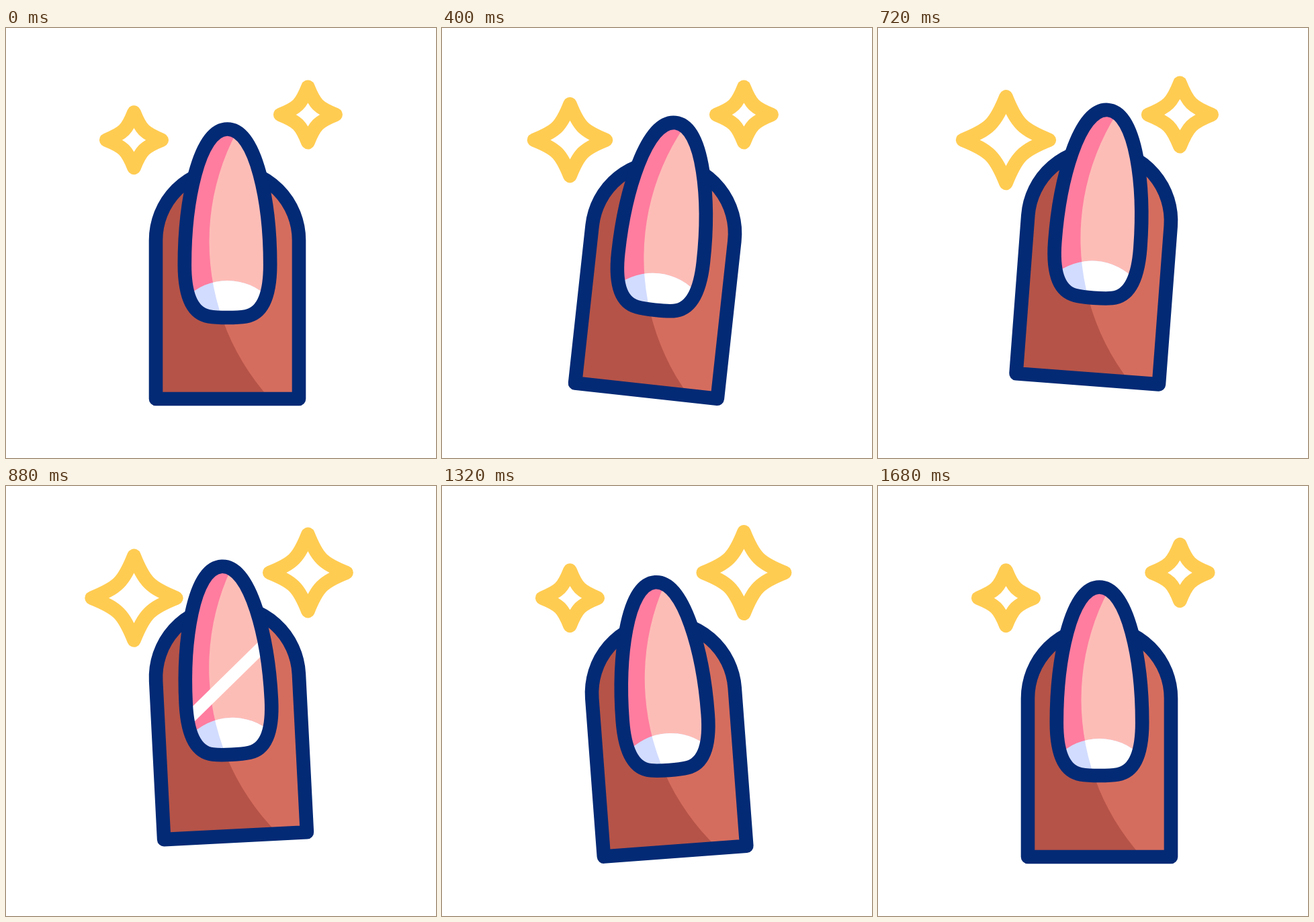
These frames come from a looping animation (640x640 px, 1.72 s). An HTML page with a canvas:

```html
<!DOCTYPE html>
<html lang="en">
<head>
<meta charset="utf-8">
<title>Shiny nail</title>
<style>
  html, body { margin: 0; width: 100%; height: 100%; overflow: hidden; background: #fff; }
  canvas { display: block; width: 640px; height: 640px; }
</style>
</head>
<body>
<canvas id="stage" width="640" height="640"></canvas>
<script>
const ctx = document.getElementById('stage').getContext('2d');
const LOOP = 1720, STEP = 40, LINE = 20.6, TAU = Math.PI * 2;
const PIVOT = { x: 329.5, y: 316 };
const COLOR = {
  navy: '#032a75', skin: '#d56d5e', skinShade: '#b55348',
  polish: '#fdbdb7', polishShade: '#ff7d9f',
  tip: '#ffffff', tipShade: '#d2dcfe', star: '#ffcc52'
};

const finger = new Path2D('M223 552V316A106.5 106.5 0 0 1 436 316V552Z');
const nail = new Path2D(
  'M329.5 150.5C286 150.5 265.8 262 265.8 352C265.8 397 277 425 302 429.3' +
  'C315 431.5 344 431.5 357 429.3C382 425 393.2 397 393.2 352C393.2 262 373 150.5 329.5 150.5Z');
const moon = circle(329.5, 463, 87);
const litSide = circle(650.5, 318, 348);

function circle(x, y, r) {
  const path = new Path2D();
  path.arc(x, y, r, 0, TAU);
  return path;
}

// Eased progress from 0 to 1 between two times.
function ease(t, from, to) {
  const u = Math.min(1, Math.max(0, (t - from) / (to - from)));
  return u * u * (3 - 2 * u);
}

const pulse = (t, a, b, c, d) => ease(t, a, b) - ease(t, c, d);

function outline(path, color) {
  ctx.strokeStyle = color;
  ctx.lineWidth = LINE;
  ctx.lineJoin = 'round';
  ctx.stroke(path);
}

function clipped(paths, draw) {
  ctx.save();
  paths.forEach(path => ctx.clip(path));
  draw();
  ctx.restore();
}

function fillAll(color) {
  ctx.fillStyle = color;
  ctx.fillRect(0, -100, 640, 840);
}

// Shaded base with the lit part on the right.
function fillShaded(shade, light) {
  fillAll(shade);
  ctx.fillStyle = light;
  ctx.fill(litSide);
}

function drawShine(t) {
  const u = ease(t, 725, 1015);
  if (u <= 0 || u >= 1) return;
  ctx.save();
  ctx.translate(PIVOT.x, 100 + 400 * u);
  ctx.rotate(-41.5 * Math.PI / 180);
  ctx.fillStyle = '#fff';
  ctx.fillRect(-200, -9, 400, 18);
  ctx.restore();
}

function drawFinger(t) {
  const angle = 6.9 * ease(t, 80, 477) - 13.8 * ease(t, 600, 1034) + 6.9 * ease(t, 1190, 1500);
  const lift = 31 * pulse(t, 125, 830, 969, 1489);
  ctx.save();
  ctx.translate(PIVOT.x, PIVOT.y - lift);
  ctx.rotate(angle * Math.PI / 180);
  ctx.translate(-PIVOT.x, -PIVOT.y);

  clipped([finger], () => fillShaded(COLOR.skinShade, COLOR.skin));
  outline(finger, COLOR.navy);

  clipped([nail], () => {
    fillShaded(COLOR.polishShade, COLOR.polish);
    clipped([moon], () => fillShaded(COLOR.tipShade, COLOR.tip));
    drawShine(t);
  });
  outline(nail, COLOR.navy);
  ctx.restore();
}

function drawStar(x, y, size) {
  const a = size * 0.25, b = size * 0.375;
  const star = new Path2D();
  ctx.save();
  ctx.translate(x, y);
  star.moveTo(0, -size);
  star.bezierCurveTo(a, -b, b, -a, size, 0);
  star.bezierCurveTo(b, a, a, b, 0, size);
  star.bezierCurveTo(-a, b, -b, a, -size, 0);
  star.bezierCurveTo(-b, -a, -a, -b, 0, -size);
  star.closePath();
  outline(star, COLOR.star);
  ctx.restore();
}

function render(now) {
  const t = Math.floor(now / STEP + 0.05) * STEP % LOOP;
  ctx.fillStyle = '#fff';
  ctx.fillRect(0, 0, 640, 640);
  drawStar(190.5, 166.7, 41.2 + 23.1 * pulse(t, 130, 650, 800, 1320));
  drawStar(449.4, 129, 41.2 + 22 * pulse(t, 540, 1060, 1210, 1735));
  drawFinger(t);
}

function tick(now) {
  render(now);
  requestAnimationFrame(tick);
}

render(0);
requestAnimationFrame(tick);
</script>
</body>
</html>
```
